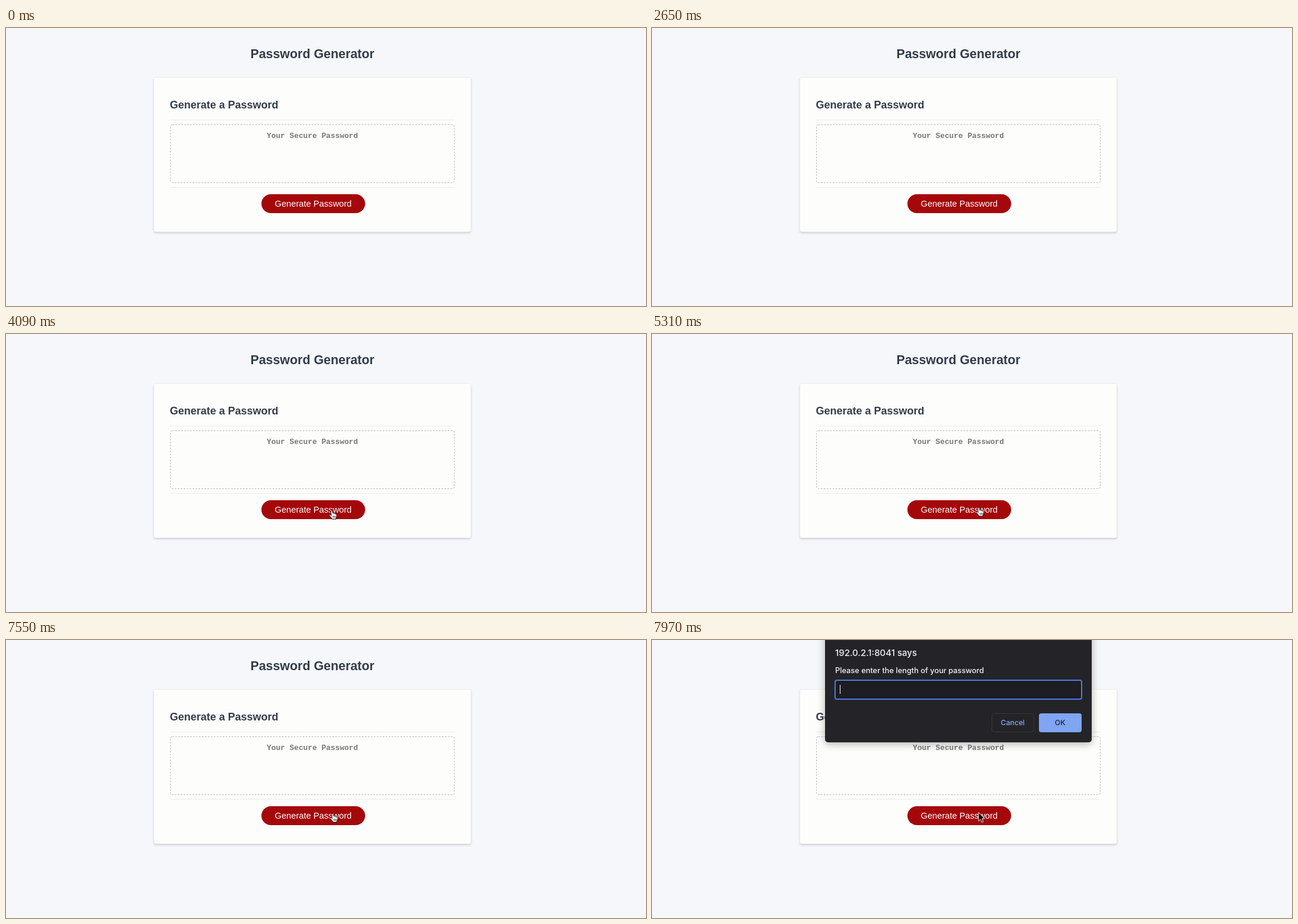
Write an HTML page that moves like this. It is 1080x470 px and loops after 7990 ms.

```html
<!DOCTYPE html>
<html lang="en">
<head>
<meta charset="utf-8">
<title>Password Generator</title>
<style>
  html, body { margin: 0; width: 100%; height: 100%; overflow: hidden; background: #f5f7fb; }
  #stage { position: absolute; inset: 0; width: 1080px; height: 470px; overflow: hidden; }
  svg { position: absolute; left: 0; top: 0; overflow: visible; }
  text { white-space: pre; }
  .page { font-family: "Liberation Sans", Arial, sans-serif; }
  .heading { font-weight: 700; fill: #333c48; }
  .hint { font: 700 12.83px "Liberation Mono", "Courier New", monospace; fill: #77777a; }
  .card { filter: drop-shadow(0 2px 1.5px rgba(60, 65, 75, .2)); }
  .rule { stroke: #ececec; }
  #dialog { transform-origin: 517px 173px; opacity: 0; font-family: Inter, Roboto, sans-serif; font-weight: 500; }
  #panel { filter: drop-shadow(0 3px 7px rgba(0, 0, 0, .3)); }
  .mid { text-anchor: middle; }
</style>
</head>
<body>
<div id="stage">
  <svg class="page" width="1080" height="470">
    <rect class="card" x="249.5" y="83.5" width="535" height="261" rx="3" fill="#fdfdfc" stroke="#ececec"/>
    <text class="heading" x="412.4" y="51" font-size="21.4">Password Generator</text>
    <text class="heading" x="276.5" y="136" font-size="18">Generate a Password</text>
    <path class="rule" d="M277 155.5H757M277 269.5H757"/>
    <rect x="277.5" y="163.5" width="479" height="98" rx="3" fill="none" stroke="#bdbdbd" stroke-dasharray="3 2"/>
    <text class="hint mid" x="517" y="186">Your Secure Password</text>
    <rect x="431" y="281" width="175" height="32" rx="16" fill="#a5080b"/>
    <text class="mid" x="518.4" y="302" font-size="14.7" fill="#fff">Generate Password</text>
  </svg>

  <svg id="dialog" width="1080" height="173">
    <rect id="panel" x="292" y="-30" width="450" height="203" rx="5" fill="#242428"/>
    <text x="309" y="26.5" font-size="15" fill="#f1f2f4">192.0.2.1:8041 says</text>
    <text x="309" y="55.5" font-size="12.8" fill="#f1f2f4">Please enter the length of your password</text>
    <rect x="309" y="68" width="416" height="32" rx="3" fill="#1d1d22" stroke="#4a7ee6" stroke-width="2"/>
    <path d="M317.5 76V91" stroke="#fff"/>
    <rect x="573.5" y="124.5" width="71" height="31" rx="4" fill="none" stroke="#36373c"/>
    <rect x="653" y="124" width="72" height="32" rx="4" fill="#7fa5f3"/>
    <g class="mid" font-size="12.2">
      <text x="608.7" y="144" fill="#82a8f5">Cancel</text>
      <text x="688.7" y="144" fill="#22242c">OK</text>
    </g>
  </svg>

  <svg id="pointer" width="20" height="20" stroke-linejoin="round">
    <path id="arrow" d="M0 0V14.6L3.3 11.5L5.6 16.8L8 15.7L5.8 10.5H10.2Z" fill="#000" stroke="#fff"/>
    <g id="hand" transform="translate(-4.5 1)" stroke="#000">
      <path fill="#fff" d="M3.4 1.2C4.4 .3 5.6 1 5.8 2.2L6.6 5.4C7.6 4.7 8.6 5 9 6C10 5.5 11 6 11.2 7C12.4 6.6 13.2 7.4 13.2 8.6C13.3 11 12 12.6 11.6 15.6H5.6C4.8 13.4 1.8 11.2 .7 9.4C0 8 1.4 7.2 2.4 8L4 9.4L3 3C2.8 2.2 3 1.6 3.4 1.2Z"/>
      <path fill="none" stroke-width=".8" d="M6.9 10V13M8.7 10V13M10.4 10V13"/>
    </g>
  </svg>
</div>

<script>
  const LOOP = 7990;
  const OPEN = 7720;   // the dialog starts to appear
  const HOVER = 3600;  // the pointer reaches the button
  const start = document.timeline.currentTime ?? performance.now();

  // steps: [time in ms, style, easing to the next step]
  function loop(el, steps) {
    const first = steps[0], last = steps[steps.length - 1];
    const all = [[0, first[1], first[0] ? "linear" : first[2]], ...steps, [LOOP, last[1]]];
    const frames = all.map(([t, style, easing = "linear"]) => ({ ...style, easing, offset: t / LOOP }));
    el.animate(frames, { duration: LOOP, iterations: Infinity }).startTime = start;
  }

  // hard changes of opacity: [time, value] pairs
  function swap(el, ...values) {
    loop(el, values.map(([t, opacity]) => [t, { opacity }, "steps(1, end)"]));
  }

  const $ = id => document.getElementById(id);
  const at = (x, y) => ({ transform: `translate(${x}px, ${y}px)` });

  loop($("pointer"), [
    [2600, at(562, 490), "ease-out"],
    [3210, at(548.5, 338)],
    [3350, at(548.5, 338), "ease-in-out"],
    [3800, at(549.5, 296.5)],
    [4250, at(549.5, 296.5), "ease-in-out"],
    [4700, at(551, 291.5)]
  ]);
  swap($("arrow"), [0, 1], [HOVER, 0], [OPEN, 1]);
  swap($("hand"), [0, 0], [HOVER, 1], [OPEN, 0]);

  // the dialog drops in while tilting upright
  const pose = (opacity, drop, tilt, size, stretch) => ({
    opacity,
    transform: `translateY(${drop}px) perspective(1000px) rotateX(${tilt}deg) scale(${size}, ${stretch})`
  });
  loop($("dialog"), [
    [OPEN, pose(0, -13, 15, 0.992, 1.045)],
    [7830, pose(0.82, -6.5, 7.5, 0.998, 1.022)],
    [7960, pose(1, 0, 0, 1, 1)]
  ]);
</script>
</body>
</html>
```
